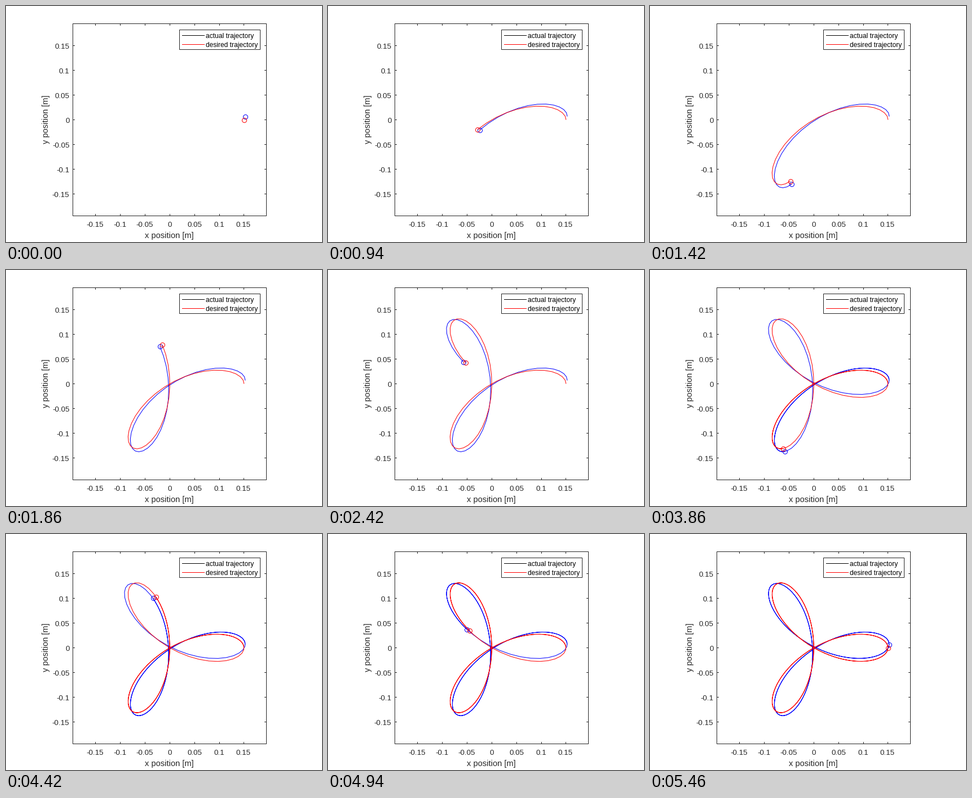
A matplotlib script that plays this animation: 560x420 px, repeating every 5.5 s.

```python
import numpy as np
import matplotlib.pyplot as plt
from matplotlib.animation import FuncAnimation
from matplotlib.patches import Rectangle

W, H, DPI = 560, 420, 100
PX = 72 / DPI                      # one pixel in points
TICK_MS, LOOP_MS = 20, 5500
HOLD_MS, STEP_MS, STEPS = 500, 40, 125
CX, CY, SCALE = 290.3, 202.5, 877  # plot origin and pixels per metre
LEFT, RIGHT, TOP, BOTTOM = 118.5, 461.5, 31.5, 373.5
TICK = 3.5
GREY = "#262626"

plt.rcParams["font.family"] = "Liberation Sans"
plt.rcParams["path.simplify"] = False


def rose(phi, fast=1, slow=1):
    """Three-leaf rose with 0.15 m leaves, made of two turning vectors."""
    return 0.075 * (fast * np.exp(2j * phi) + slow * np.exp(-1j * phi))


# The real motion follows each vector with its own gain and phase shift.
phase = 4 * np.pi * np.arange(STEPS + 1) / STEPS
desired = rose(phase)
actual = rose(phase, 1.006 + 0.017j, 1.032 + 0.073j) - 0.0004

fig = plt.figure(figsize=(W / DPI, H / DPI), dpi=DPI, facecolor="white")
ax = fig.add_axes([0, 0, 1, 1])
ax.set_xlim(0, W)
ax.set_ylim(H, 0)
ax.axis("off")


def line(xs, ys, color=GREY, z=2):
    return ax.plot(xs, ys, color=color, lw=PX, zorder=z, snap=False,
                   solid_capstyle="butt")[0]


def box(x0, y0, x1, y1, z):
    ax.add_patch(Rectangle((x0, y0), x1 - x0, y1 - y0, fc="white", ec=GREY,
                           lw=PX, zorder=z, snap=False))


def text(x, y, s, size, ha="center", color=GREY, **kw):
    ax.text(x, y, s, fontsize=size * PX, ha=ha, va="baseline", color=color,
            zorder=7, **kw)


def pixel(v):
    """Centre of the pixel that holds v."""
    return np.floor(v) + 0.5


# Axes box, ticks and labels
box(LEFT, TOP, RIGHT, BOTTOM, 1)
for i in range(-3, 4):
    value = 0.05 * i
    x, y = pixel(CX + SCALE * value), pixel(CY - SCALE * value)
    line([x, x], [BOTTOM, BOTTOM - TICK])
    line([x, x], [TOP, TOP + TICK])
    line([LEFT, LEFT + TICK], [y, y])
    line([RIGHT, RIGHT - TICK], [y, y])
    label = f"{value:.2g}"
    text(x - 0.5, 393, label, 13.33)
    text(112.5, y + 5.5, label, 13.33, ha="right")
text(289.7, 413, "x position [m]", 14.67)
text(74.5, 201.7, "y position [m]", 14.67, rotation=90,
     rotation_mode="anchor")

# Legend
box(307.5, 42.5, 450.5, 77.5, 5)
for y, name, color in [(52.5, "actual", "black"), (68.5, "desired", "red")]:
    line([312, 352], [y, y], color, 6)
    text(354, y + 4.5, name + " trajectory", 12, ha="left", color="black")


def tracer(z, color, order):
    dot = ax.plot([], [], "o", ms=8 * PX, mfc="none", mec=color, mew=PX,
                  zorder=order, snap=False)[0]
    path = line([], [], color, order)
    return CX + SCALE * z.real, CY - SCALE * z.imag, path, dot


tracers = [tracer(actual, "blue", 3), tracer(desired, "red", 4)]


def update(frame):
    t = frame * TICK_MS
    k = 0 if t < HOLD_MS else (t - HOLD_MS) // STEP_MS + 1
    for xs, ys, path, dot in tracers:
        path.set_data(xs[:k + 1], ys[:k + 1])
        dot.set_data([xs[k]], [ys[k]])
    return []


anim = FuncAnimation(fig, update, frames=LOOP_MS // TICK_MS,
                     interval=TICK_MS, repeat=True, repeat_delay=0)
plt.show()
```
